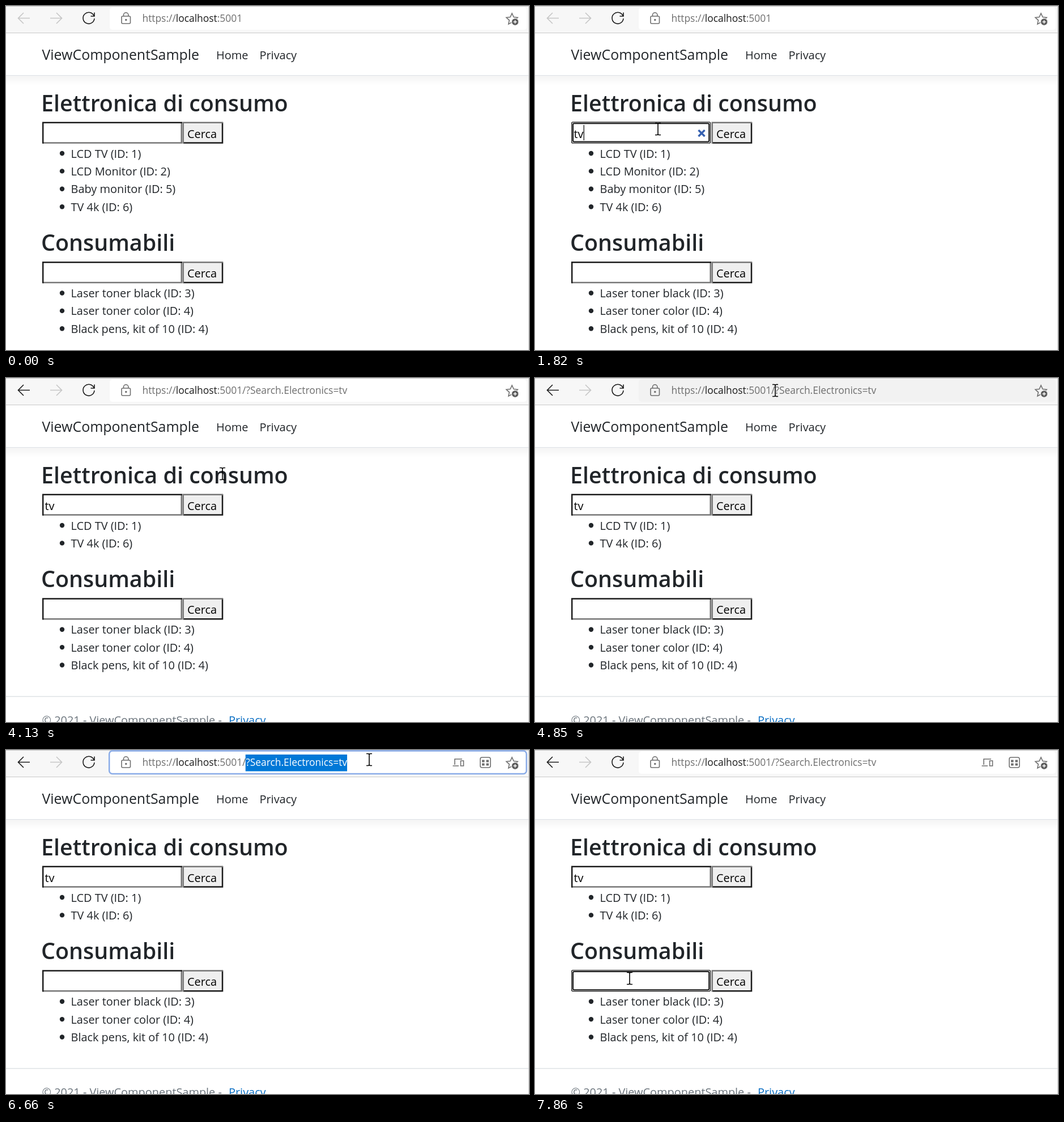
An HTML page for the animation above (8000 ms loop, 923x607 px).

```html
<!DOCTYPE html>
<html lang="it">
<head>
<meta charset="utf-8">
<title>ViewComponentSample</title>
<style>
html, body { margin: 0; width: 100%; height: 100%; overflow: hidden; background: #fff; }
svg { display: block; font: 19.9px "Open Sans", "Noto Sans", sans-serif; fill: #212529; }
.line { fill: none; stroke: #1b1b1b; stroke-width: 1.6; }
.grey { stroke: #6e6e6e; }
.off { stroke: #c6c6c6; }
.url { font-size: 17.4px; fill: #6e6e6e; white-space: pre; }
h2, .head { font-size: 39.4px; font-weight: 600; }
.cursor { fill: #fff; stroke: #000; stroke-width: 1.3; stroke-linejoin: round; }
</style>
</head>
<body>
<svg width="923" height="607" viewBox="0 0 923 607">
  <defs>
    <linearGradient id="shade" x2="0" y2="1">
      <stop stop-opacity=".045"/><stop offset="1" stop-opacity="0"/>
    </linearGradient>
  </defs>

  <!-- browser bar -->
  <rect width="923" height="48" fill="#f7f7f7"/>
  <path d="M0 .5H923M0 47.5H923" class="line" style="stroke:#c8c8c8;stroke-width:1"/>
  <path id="back" class="line" d="M42 21.5H21.5M31 12L21.5 21.5L31 31"/>
  <path class="line off" d="M78 21.5H98.500M89 12L98.500 21.500L89 31"/>
  <path class="line" d="M155.300 17.500A10 10 0 1 0 156 22M156 11.500V18H149.500"/>
  <rect id="bar" x="183" y="2.500" width="736" height="39.500" rx="5"/>
  <rect id="ring" x="182.200" y="1.500" width="736.300" height="40.500" rx="5.500" fill="none" stroke="#8aace8" stroke-width="2.500"/>
  <g class="line grey">
    <rect x="204" y="18" width="15.500" height="13" rx="2"/>
    <path d="M207.500 18V16a4.200 4.200 0 0 1 8.400 0V18"/>
    <circle cx="211.800" cy="24.500" r="1" fill="#6e6e6e"/>
    <path d="M893 13l3 6.500 7 .8-5.200 4.800 1.400 7L893 28.600 886.800 32l1.400-6.900L883 20.300l7-.8z"/>
  </g>
  <circle cx="898.500" cy="28" r="6.300" fill="#5f5f5f" stroke="#fff"/>
  <path d="M895.500 28h6M898.500 25v6" stroke="#fff" stroke-width="1.400"/>
  <g id="icons" class="line grey">
    <path d="M805 16H792V26M788.500 28H799M802.500 19H807.500V28H802.500z"/>
    <rect x="837" y="13" width="18" height="18" rx="3"/>
    <path d="M840 19.500h4.500M847.500 19.500h4.500M840 25.500h4.500M847.500 25.500h4.500" stroke-width="4"/>
  </g>
  <text class="url" x="240.500" y="28">https://<tspan fill="#1b1b1b">localhost</tspan>:5001<tspan id="query"></tspan></text>
  <rect id="mark" x="422.700" y="8" height="29.500" fill="#0078d7"/>
  <text id="marked" class="url" x="423.300" y="28" style="fill:#fff"></text>

  <!-- page -->
  <rect y="123" width="923" height="17" fill="url(#shade)"/>
  <path d="M0 122.500H923" stroke="#dee2e6"/>
  <text x="63.500" y="95" font-size="24.900">ViewComponentSample</text>
  <text x="371" y="93.500">Home</text>
  <text x="447.500" y="93.500">Privacy</text>
  <g id="first"></g>
  <g id="second"></g>
  <g id="footer">
    <path d="M0 562H923" stroke="#dee2e6" stroke-width="1.300"/>
    <text x="63.500" y="611" fill="#6c757d">© 2021 - ViewComponentSample -</text>
    <text x="393" y="611" fill="#0b6fc4">Privacy</text>
  </g>
  <path d="M922.500 0V607" stroke="#cfcfcf"/>

  <g id="pointer">
    <path id="arrow" class="cursor" d="M0 0V21L4.700 16.800L8 24L11.300 22.600L8.200 15.400H14.700z"/>
    <path id="beam" class="line" d="M-5 -10.500H-1.500L0 -9.500L1.500 -10.500H5M-5 10.500H-1.500L0 9.500L1.500 10.500H5M0 -10V10" style="stroke:#000"/>
    <path id="hand" class="cursor" d="M-1.500 15V1.500Q-1.500 -1 .7 -1T2.800 1.500V8Q5 6.800 6.300 8.800Q8.500 7.800 9.800 10Q12.800 9.600 12.800 12.500V18Q12.800 22 10 25.500H-1Q-3 21 -7 16.500Q-8.500 14 -6.300 13Q-4.500 12.500 -1.500 15zM2.800 8V13M6.300 9V13.500M9.800 10V14"/>
    <circle id="click" r="16" fill="#f5ec35" opacity=".75"/>
  </g>
</svg>

<script>
const $ = id => document.getElementById(id);
const show = (id, on) => $(id).setAttribute('visibility', on ? 'visible' : 'hidden');
const put = (id, html) => { if ($(id).memo !== html) $(id).innerHTML = $(id).memo = html; };
const within = (t, a, b) => t >= a && t < b;

const query = '?Search.Electronics=tv';
const devices = ['LCD TV (ID: 1)', 'LCD Monitor (ID: 2)', 'Baby monitor (ID: 5)', 'TV 4k (ID: 6)'];
const supplies = ['Laser toner black (ID: 3)', 'Laser toner color (ID: 4)', 'Black pens, kit of 10 (ID: 4)'];

const path = (d, color) => `<path d="${d}" fill="none" stroke="${color}" stroke-width="2.500"/>`;
const frame = (x, y, w, h, width, r) =>
  `<rect x="${x}" y="${y}" width="${w}" height="${h}" rx="${r}" fill="none" stroke="#111" stroke-width="${width}"/>`;

// Title, search form and list; y is the top of the form.
function section(y, title, items, { text = '', focus, pressed, caret }) {
  let s = `<text class="head" x="62" y="${y - 18.5}">${title}</text>`;
  if (focus) {
    s += frame(64.7, y + .9, 244.800, 37, 1.3, 2) + frame(67, y + 3.2, 240.200, 32.400, 2, 2);
    if (text) s += `<path d="M288.500 ${y + 15}l11 11m0 -11l-11 11" stroke="#3560b0" stroke-width="3.400"/>`;
  } else {
    s += path(`M65 ${y + 37.5}H309.700V${y + 1}`, '#767676') + path(`M65.200 ${y + 38.8}V${y + 1.7}H311`, '#1b1b1b');
  }
  s += `<rect x="312" y="${y + .5}" width="71" height="38" rx="${pressed ? 3 : 0}" fill="#efefef"/>`;
  s += pressed ? frame(312.7, y + 1.5, 69.600, 36.600, 2.3, 2)
    : path(`M313 ${y + 37.6}H382V${y + 1}`, '#1b1b1b') + path(`M312.700 ${y + 38.8}V${y + 1.7}H383`, '#767676');
  s += `<text x="320" y="${y + 28.5}" fill="#000">Cerca</text><text x="68.500" y="${y + 28.5}" fill="#000">${text}</text>`;
  if (caret) s += `<rect x="${caret}" y="${y + 6}" width="1.200" height="27" fill="#000"/>`;
  items.forEach((item, i) => {
    const base = y + 63.5 + i * 31.4;
    s += `<circle cx="99" cy="${base - 7.5}" r="4.200"/><text x="114.500" y="${base}">${item}</text>`;
  });
  return s;
}

// Pointer moves: start, end, steps, from, to, easing over 0..1.
const moves = [
  [500, 1100, 7, [463, 400], [217, 217], u => Math.min(1, u * 1.5)],
  [2020, 2320, 4, [249, 220], [344, 227], u => u],
  [4130, 4850, 8, [382, 169], [424, 22], u => 1 - (1 - u) ** 2],
  [4950, 5550, 7, [424, 22], [612, 23], u => u ** 1.5],
  [6660, 7460, 9, [641, 17], [159, 404], u => { u = Math.min(1, u * 8 / 7); return u * u * (3 - 2 * u); }],
  [7660, 7660, 1, [167, 403], [167, 403], u => u],
];

function pointerAt(t) {
  const move = moves.findLast(m => t >= m[0]);
  if (!move) return null;
  const [start, end, steps, from, to, ease] = move;
  const n = steps - 1;
  const step = n ? Math.min(n, Math.floor((t - start) / (end - start) * n + .01)) : 0;
  const p = ease(n ? step / n : 1);
  return from.map((v, i) => v + (to[i] - v) * p);
}

// Areas that show the text pointer: left, top, right, bottom.
const textAreas = [[183, 0, 920, 43], [64, 150, 500, 195], [64, 204, 310, 243], [64, 335, 300, 378], [64, 388, 310, 427]];
const inside = ([x, y], [l, top, r, b]) => x >= l && x <= r && y >= top && y <= b;

function draw(t) {
  const found = t >= 2820;
  const editing = within(t, 4950, 7360);
  const pos = pointerAt(t);

  $('back').setAttribute('class', found ? 'line' : 'line off');
  put('query', found ? '/' + query : '');
  show('footer', found);
  show('icons', t >= 4950);
  show('ring', editing);
  $('bar').setAttribute('fill', within(t, 4130, 4950) && pos[1] < 43 ? '#f2f2f2' : '#fff');

  const drag = Math.min(6, Math.floor((t - 4950) / 100));
  const count = editing ? [0, 1, 3, 6, 12, 18, 22][drag] : 0;
  put('marked', query.slice(0, count));
  $('mark').setAttribute('width', count ? $('marked').getComputedTextLength() + .6 : 0);

  const text = t < 1520 ? '' : t < 1820 ? 't' : 'tv';
  put('first', section(204, 'Elettronica di consumo', found ? [devices[0], devices[3]] : devices, {
    text,
    focus: within(t, 1000, 2720),
    pressed: within(t, 2720, 2820),
    caret: within(t, 1000, 2320) && [69.5, 75.2, 85.7][text.length],
  }));
  put('second', section(found ? 387.700 : 450.500, 'Consumabili', supplies, {
    focus: t >= 7360,
    caret: within(t, 7360, 7860) && 69,
  }));

  const beam = pos && textAreas.some(a => inside(pos, a));
  const hand = pos && inside(pos, [311, 204, 383, 243]);
  show('beam', beam);
  show('hand', hand);
  show('arrow', pos && !beam && !hand);
  show('click', within(t, 900, 1100) || within(t, 2720, 2820) || within(t, 4950, 5550) || within(t, 7360, 7460));
  if (pos) $('pointer').setAttribute('transform', `translate(${pos})`);
}

const begin = performance.now();
function tick() {
  draw((performance.now() - begin) % 8000);
  requestAnimationFrame(tick);
}
tick();
</script>
</body>
</html>
```
